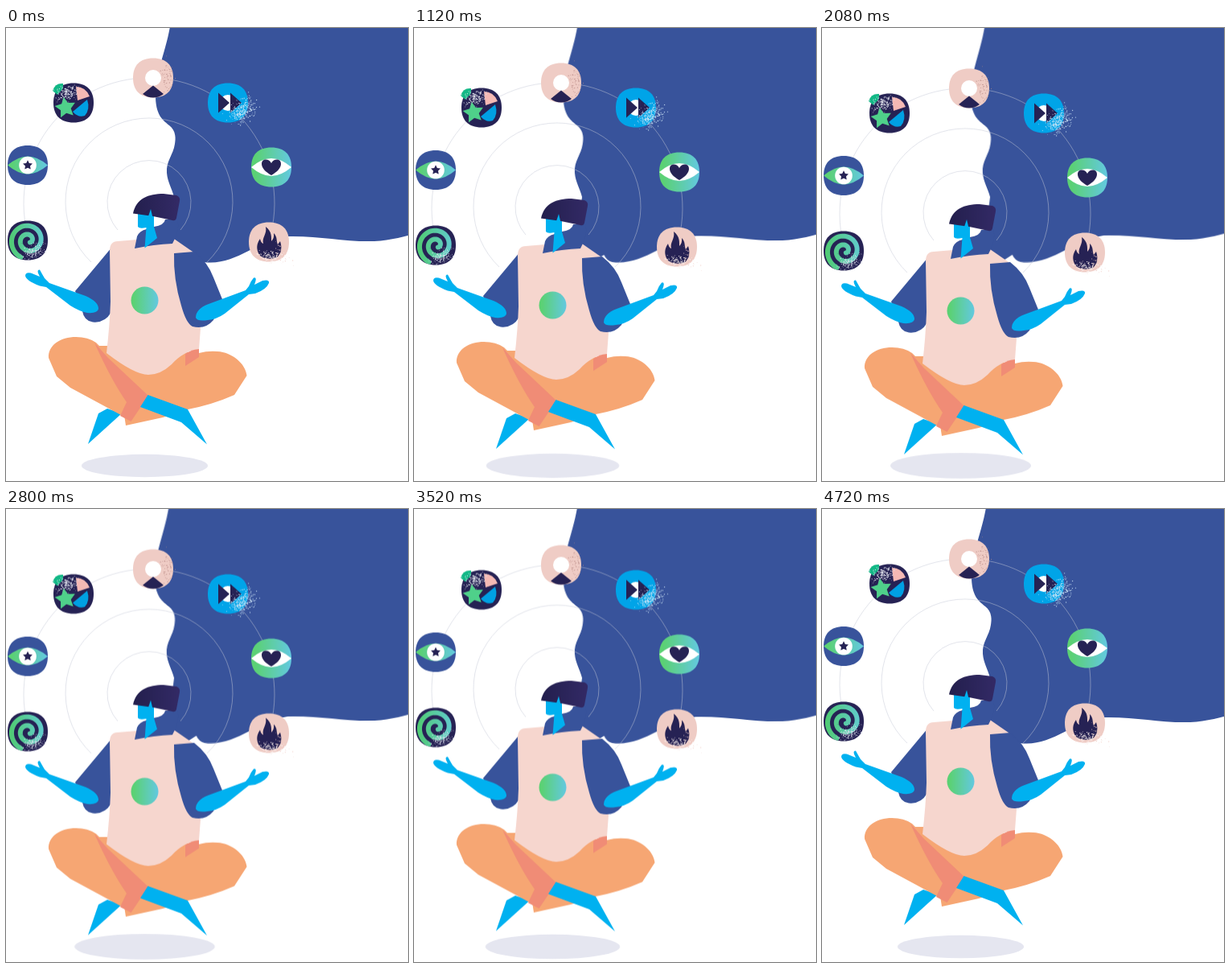
Recreate the animation shown at these times as an HTML page. Size 500 by 563 pixels, loop 4.8 s.

```html
<!DOCTYPE html>
<html lang="en">
<head>
<meta charset="utf-8">
<title>Meditation</title>
<style>
  html, body { margin: 0; width: 100%; height: 100%; overflow: hidden; background: #fff; }
  svg { display: block; width: 100%; height: 100%; }
  .bob, .shadow, .cloud { animation: 2400ms cubic-bezier(.37, 0, .63, 1) infinite alternate; }
  .bob { animation-name: bob; }
  .shadow { animation-name: spread; transform-origin: 172.5px 544px; }
  .cloud { animation-name: sway; transform-origin: 210px 200px; }
  @keyframes bob { to { transform: translateY(13.5px); } }
  @keyframes spread { to { transform: scale(1.12, 1.13); } }
  @keyframes sway { to { transform: rotate(-.5deg); } }
  .blue { fill: #38539b; }
  .sky { fill: #00b1f0; }
  .pink { fill: #f6d6ce; }
  .rose { fill: #efccc5; }
  .orange { fill: #f6a673; }
  .salmon { fill: #f08c76; }
  .navy { fill: #262254; }
  .mint { fill: url(#mint); }
  .white { fill: #fff; }
  .rings { fill: none; stroke: #c6cad8; stroke-opacity: .5; }
</style>
</head>
<body>
<svg viewBox="0 0 500 563" preserveAspectRatio="none">
  <defs>
    <linearGradient id="mint">
      <stop offset=".1" stop-color="#5bd174"/>
      <stop offset="1" stop-color="#63c9e0"/>
    </linearGradient>
    <linearGradient id="spiralTone" gradientUnits="userSpaceOnUse" x1="-25" y1="0" x2="25" y2="0">
      <stop stop-color="#4fcb6d"/>
      <stop offset="1" stop-color="#63cbd8"/>
    </linearGradient>
    <linearGradient id="hair">
      <stop stop-color="#231f4d"/>
      <stop offset="1" stop-color="#332a66"/>
    </linearGradient>
    <path id="pebble" d="M25 0C25 15.500 16.500 24.500 0 24.500S-25 15.500-25 0-16.500-24.500 0-24.500 25-15.500 25 0Z"/>
    <path id="lens" d="M-25 0Q-12-11 0-11T25 0Q12 11 0 11T-25 0Z"/>
    <clipPath id="inPebble"><use href="#pebble"/></clipPath>
  </defs>

  <path class="cloud blue" d="M205-8C200 28 185 55 186 87C187 110 196 115 203 121C212 128 211 138 210 144
    C208 158 199 165 200 180C201 192 206 198 209 210L205 240L205 285L225 289L236 282Q239 289 246 291
    C285 296 310 265 350 259C390 258 420 266 458 265C480 264 494 259 520 253V-20H205Z"/>
  <ellipse class="shadow" cx="172.500" cy="544" rx="78.500" ry="14.200" fill="#e5e6f0"/>

  <g class="bob">
    <g class="rings">
      <path d="M139 251A52 52 0 1 1 217 251"/>
      <path d="M106 291A104 104 0 1 1 250 291"/>
      <path d="M29 264A156 156 0 1 1 327 264"/>
    </g>

    <path class="sky" d="M102 517L115 479L126 473L144 479Z"/>
    <path class="orange" d="M53 410C52 394 68 384 87 384Q102 384 112 391L116 395H127L240 404
      Q251 401 263 402C281 403 298 417 299.500 432L284 456Q257 468 226 474L195 484L149 494L147 481L143 481L80 447L63 433Z"/>
    <path class="salmon" d="M110 391L127 410L177 457L155.500 489L142 482L150 465Q131 438 110 391Z"/>
    <path class="sky" d="M176.500 456L226 474L250 517.500L218 490L167 471Z"/>
    <path class="blue" d="M132 272L86 327L95 352Q97 364 108 365.500Q123 367 131 353Z"/>
    <path class="pink" d="M129 277Q129 265 139 265L163 263L209 262L235 280L225 290L242 373L240 399
      Q220 402 206 418Q192 431 177 431Q160 431 125 404Q129 370 130 340Z"/>
    <path class="salmon" d="M223 405Q232 399 240 399L240 409L223 420Z"/>
    <path class="blue" d="M209 280L234 278Q251 291 258 310L269 337L258 363Q248 375 232 371Q224 367 218 345Q208 312 209 280Z"/>

    <path class="white" d="M183 234L199 237Q197 244 190 246L183 248Z"/>
    <path class="blue" d="M160 274L163 259Q166 252 175 250L184 247Q197 245 198 238L213 238Q217 249 207 268Q184 269 160 274Z"/>
    <path class="sky" d="M164 230L184 232L184 247L188 261L172.500 273.500L174.500 248Q166 250 164 247Z"/>
    <path fill="url(#hair)" d="M158 230.500C162 212 177 206 196 206L212 208Q217 210 216 215L212 236Q211 240 207 239L183 234L158 230.500Z"/>
    <path class="sky" d="M177 234L180 225L184 242L178 246Z"/>

    <path class="sky" d="M24 308Q24 303 31 304.500L42 309Q37 300 42 300.500Q45 306 48 311L54 317L99 333
      Q115 340 115 349Q114 355 101 354Q91 352 80 345L50 322L42 320.500Q25 314 24 308Z"/>
    <path class="sky" d="M327 317Q328 312 319 314L309 319Q313 309 308 310.500Q304 315 302 321L298 326L252 343
      Q236 349 236 360Q238 365 251 363Q262 362 272 355L302 331L310 330Q324 325 327 317Z"/>
    <circle class="mint" cx="172.500" cy="338.500" r="17"/>

    <g transform="translate(27 264)">
      <use href="#pebble" class="navy"/>
      <g clip-path="url(#inPebble)">
        <path id="spiral" fill="none" stroke="url(#spiralTone)" stroke-width="6" stroke-linecap="round"/>
      </g>
      <g id="spiralDust"></g>
    </g>

    <g transform="translate(27 170.500)">
      <use href="#pebble" class="blue"/>
      <use href="#lens" class="mint"/>
      <circle class="white" r="10.800"/>
      <path class="navy star" transform="scale(6.300)"/>
    </g>

    <g transform="translate(84 93)">
      <use href="#pebble" class="navy"/>
      <path fill="#12b886" d="M-26-15Q-23-25-13-24L-13-18L-20-10Z"/>
      <path fill="#f5b9b4" d="M3-20Q15-20 20-8L5-3Z"/>
      <path fill="#00a0e3" d="M-1 11L17-4Q21 8 14 16Q6 19-1 11Z"/>
      <path fill="#4fd08a" class="star" transform="translate(-10 6) rotate(-10) scale(13.500)"/>
      <g id="starDust"></g>
    </g>

    <g transform="translate(183 62)">
      <use href="#pebble" class="rose"/>
      <circle class="white" r="10"/>
      <path class="navy" d="M-13 20L0 9.500L13 20Q7 24.500 0 24.500T-13 20Z"/>
      <g id="topDust"></g>
    </g>

    <g transform="translate(276 93)">
      <use href="#pebble" fill="#00a4e8"/>
      <circle class="white" r="10"/>
      <path class="navy" d="M-12-12.500L2 0L-12 12.500ZM3-12.500L17 0L3 12.500Z"/>
      <g id="skipDust"></g>
    </g>

    <g transform="translate(330 173)">
      <use href="#pebble" class="mint"/>
      <use href="#lens" class="white"/>
      <path class="navy" d="M0 10C-7 6-12 1-12-4C-12-11-3-11 0-5C3-11 12-11 12-4C12 1 7 6 0 10Z"/>
    </g>

    <g transform="translate(327 266)">
      <use href="#pebble" class="rose"/>
      <path class="navy" d="M-13 14C-17 5-13-1-11-4Q-10 1-7 2C-9-6-2-10-4-19C4-13 3-6 3-1Q7-5 6-11C11-6 9-1 11 3L14-1C17 8 15 15 10 19Q0 23-10 18Z"/>
      <g id="flameDust"></g>
    </g>
  </g>
</svg>
<script>
  const $ = id => document.getElementById(id);

  let seed = 11;
  const rand = () => (seed = seed * 16807 % 2147483647) / 2147483647;
  const spread = () => rand() + rand() + rand() - 1.5;

  // Soft cloud of small square grains around (x, y).
  function dust(id, count, x, y, w, h, color, tilt = 0) {
    let d = '';
    for (let i = 0; i < count; i++) {
      const s = .5 + rand() * .6;
      const px = spread() * w, py = spread() * h;
      d += `M${px.toFixed(1)} ${py.toFixed(1)}h${s}v${s}h${-s}z`;
    }
    $(id).innerHTML += `<path d="${d}" fill="${color}" transform="translate(${x} ${y}) rotate(${tilt})"/>`;
  }

  const points = (n, at) => 'M' + Array.from({ length: n }, (_, i) => at(i).map(v => v.toFixed(3))).join('L');

  const star = points(10, i => {
    const a = i * Math.PI / 5 - Math.PI / 2, r = i % 2 ? .5 : 1;
    return [r * Math.cos(a), r * Math.sin(a)];
  }) + 'Z';
  document.querySelectorAll('.star').forEach(el => el.setAttribute('d', star));

  $('spiral').setAttribute('d', points(90, i => {
    const a = 2 + i / 89 * 11.5, r = 23 - i / 89 * 20;
    return [r * Math.cos(a) + 1, r * Math.sin(a)];
  }));

  dust('spiralDust', 170, 7, 14, 14, 8, '#dfe3ee', -25);
  dust('starDust', 190, -8, -13, 14, 9, '#e4e6ef', -15);
  dust('topDust', 55, 18, -3, 7, 18, '#b98a86');
  dust('skipDust', 340, 17, 10, 17, 12, '#cfe6f7', -30);
  dust('flameDust', 130, 1, 18, 16, 8, '#fbf1ef');
  dust('flameDust', 50, 16, 14, 12, 12, '#efccc5');
</script>
</body>
</html>
```
